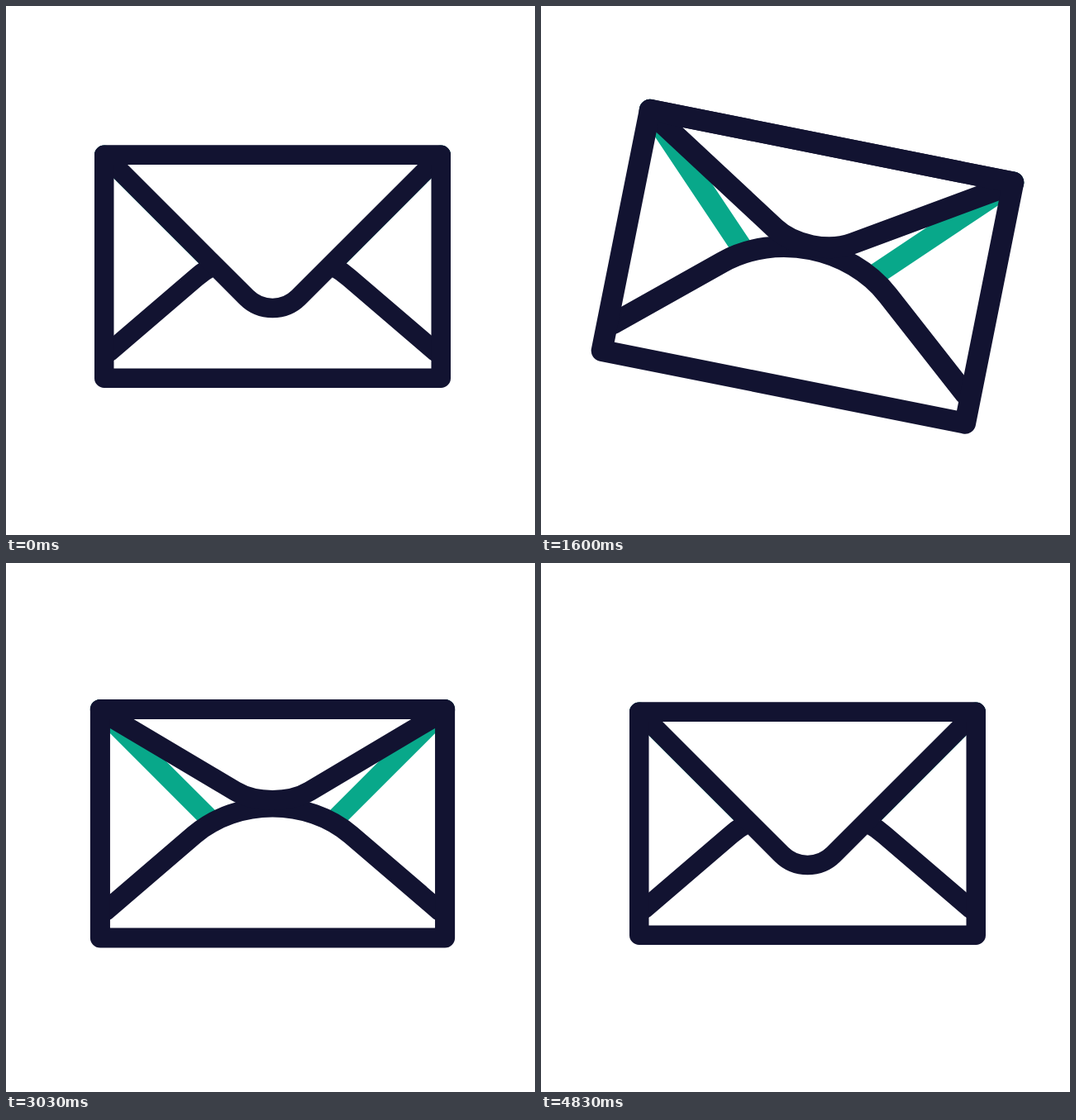
An HTML page for the animation above (5010 ms loop, 640 by 640 pixels).

```html
<!DOCTYPE html>
<html lang="en">
<head>
<meta charset="utf-8">
<title>Envelope</title>
<style>
  html, body { margin: 0; width: 100%; height: 100%; overflow: hidden; background: #fff; }
  svg { display: block; width: 100vw; height: 100vh; }
  path, rect { fill: #fff; stroke: #121331; stroke-width: 23.5; stroke-linejoin: round; stroke-linecap: round; }
  .fill { stroke: none; }
  .line { fill: none; }
  #lining { fill: none; stroke: #08a88a; }
</style>
</head>
<body>
<svg viewBox="0 0 640 640">
  <g id="mail">
    <rect class="fill" x="118.75" y="180.25" width="407.5" height="270"/>
    <path id="lining"/>
    <path class="fill" id="pocketFill"/>
    <path class="line" id="pocket"/>
    <path id="flap"/>
    <rect class="line" x="118.75" y="180.25" width="407.5" height="270"/>
  </g>
</svg>
<script>
const LOOP = 5010;
const CX = 322.5, CY = 315.25;
const LEFT = 118.75, TOP = 180.25, BOTTOM = 450.25;
const el = id => document.getElementById(id);

// Cubic Bezier easing with y handles at 0 and 1.
function bezier(x1, x2) {
  return x => {
    let lo = 0, hi = 1;
    for (let i = 0; i < 24; i++) {
      const u = (lo + hi) / 2, v = 1 - u;
      if (3 * v * v * u * x1 + 3 * v * u * u * x2 + u * u * u < x) lo = u;
      else hi = u;
    }
    return lo * lo * (3 - 2 * lo);
  };
}
const swift = bezier(0.4, 0.2);
const smooth = x => x * x * (3 - 2 * x);

// Each segment: start time, end time, end value, easing.
function track(first, segments) {
  return t => {
    let value = first;
    for (const [start, end, target, ease] of segments) {
      if (t <= start) break;
      value += (target - value) * ease(Math.min(1, (t - start) / (end - start)));
    }
    return value;
  };
}

const angle = track(0, [
  [0, 620, -13.4, swift],
  [640, 1570, 11.3, swift],
  [1650, 2600, 0, smooth]
]);
const scale = track(1, [
  [0, 620, 0.858, swift],
  [640, 1510, 1.1, swift],
  [1720, 2720, 0.968, smooth],
  [2720, 2980, 1.024, smooth],
  [2980, 3720, 1, swift]
]);
const slope = track(1, [
  [1110, 2010, 0.537, swift],
  [2600, 4830, 1, swift]
]);

// Two straight sides joined by a rounded tip; a negative slope makes an arch.
function chevron(x, y, m, half) {
  const apex = y + m * (CX - x);
  const endY = apex - m * half;
  const handleY = endY + m * half * 0.552;
  const handleX = half * 0.448;
  return `M${x} ${y}L${CX - half} ${endY}` +
    `C${CX - handleX} ${handleY} ${CX + handleX} ${handleY} ${CX + half} ${endY}` +
    `L${2 * CX - x} ${y}`;
}

function flapShape(m) {
  return chevron(LEFT, TOP + 4.3 * (1 - m), m, 31.6 + 31 * (1 - m));
}

const arch = chevron(125, 418.6, -0.857, 92.8);
el("lining").setAttribute("d", flapShape(1));
el("pocket").setAttribute("d", arch);
el("pocketFill").setAttribute("d", `${arch}V${BOTTOM}H125Z`);

function draw(t) {
  el("flap").setAttribute("d", flapShape(slope(t)) + `V${TOP}H${LEFT}Z`);
  el("mail").setAttribute("transform",
    `translate(${CX} ${CY}) rotate(${angle(t)}) scale(${scale(t)}) translate(${-CX} ${-CY})`);
}

const begin = performance.now();
function tick() {
  draw((performance.now() - begin) % LOOP);
  requestAnimationFrame(tick);
}
draw(0);
requestAnimationFrame(tick);
</script>
</body>
</html>
```
